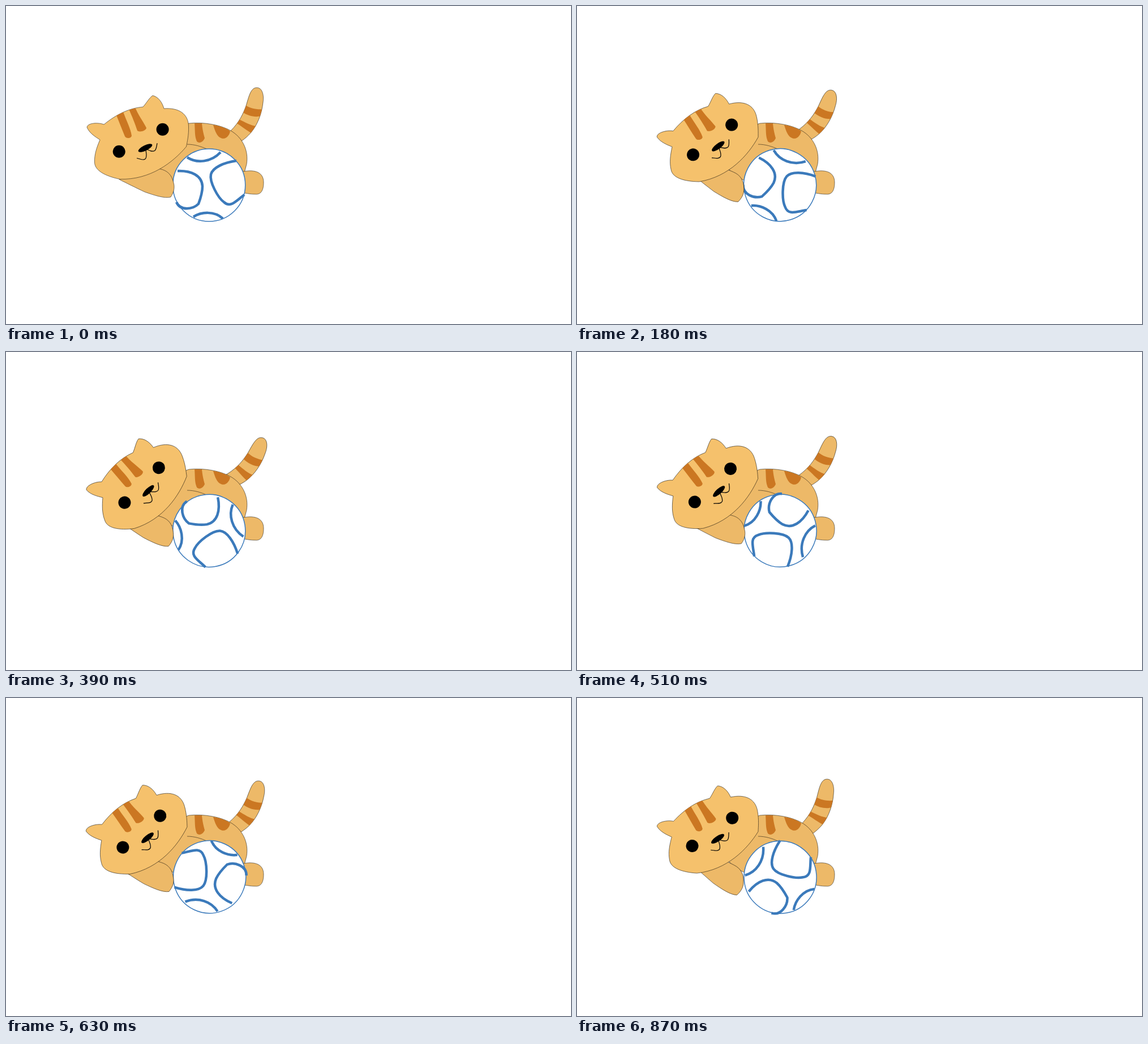
These frames come from a looping animation (998 by 561 pixels, 0.96 s). An HTML page:

```html
<!DOCTYPE html>
<html lang="en">
<head>
<meta charset="utf-8">
<title>Kitten with ball</title>
<style>
  html, body { margin: 0; width: 100%; height: 100%; overflow: hidden; background: #fff; }
  svg { display: block; width: 100vw; height: 100vh; }
  .fur { fill: #edb968; stroke: #000; stroke-width: .5; }
  .face { fill: #f5c16c; }
  .stripe { fill: #cb7722; }
  .line { fill: none; stroke: #000; stroke-width: .5; }
  .mouth { fill: none; stroke: #000; stroke-width: 1.2; }
  .seam { fill: none; stroke: #3b7abb; stroke-width: 4.5; }
</style>
</head>
<body>
<svg viewBox="0 0 998 561">
  <defs>
    <path id="tailShape" d="M390 226L397 220C412 205 419 190 424 176C429 160 432 144 443 144C453 144 456 158 454 170C452 190 444 210 433 223C427 230 420 236 410 242Z"/>
    <path id="headShape" d="M143 214C144 206 163 205 173 209C195 191 218 180 242 178C249 170 253 162 259 158C269 160 276 170 279 181C305 179 322 190 322.5 212C323 228 320 240 318.5 248C295 276 255 307 201 305.5C175 300 156 290 156.5 275C156 262 160 250 166 236C158 231 147 224 143 214Z"/>
    <clipPath id="tailClip"><use href="#tailShape"/></clipPath>
    <clipPath id="headClip"><use href="#headShape"/></clipPath>
  </defs>

  <g id="tail">
    <use href="#tailShape" class="fur"/>
    <path class="stripe" clip-path="url(#tailClip)" d="M423 175C432 181 443 183 455 182L451 194C440 197 428 194 417 187ZM412 200C422 205 432 211 443 212L435 225C424 219 415 211 406 206Z"/>
  </g>

  <path class="fur" d="M310 212L323 207C350 204 380 210 397 220C418 232 429 255 425 279L421 294L400 330L330 340L300 310L280 300L250 270Z"/>
  <path class="stripe" d="M333 207L346 207C347 218 349 226 351 233C347 243 337 243 336 236C333 228 334 215 333 207ZM366 210C380 212 390 216 396 221C394 231 386 236 380 233C373 231 369 220 366 210Z"/>
  <path class="line" d="M320 244C333 244 345 248 354 252"/>
  <path class="fur" d="M415 292L422 291.5C445 288 455 297 455 311C455 326 450 333 440 332C432 332 428 331 415 329Z"/>

  <g id="ball">
    <circle cx="358.7" cy="316" r="64" fill="#fff" stroke="#3b7abb" stroke-width="1.5"/>
    <path class="seam" d="M320 267C337 278 362 276 379 258M407 273C385 276 365 285 362 297C359 310 374 338 385 346C397 357 407 343 421 333M303 291C327 290 346 299 347 318C347 330 343 341 340 349C330 359 308 362 301 346M331 372C345 363 368 361 383 375"/>
  </g>

  <path id="arm" class="fur" d="M215 270L255 284L272 287.5C285 290 293 298 296 312C299 322 295 331 291 337C280 340 262 334 245 328C230 321 212 312 200 306Z"/>

  <g id="head">
    <use href="#headShape" class="fur face"/>
    <path class="stripe" clip-path="url(#headClip)" d="M194 190L206 184C213 204 220 215 222 229C221 234 212 234 210 230C205 218 200 205 194 190ZM216 180L227 176C233 192 242 203 248 215C247 221 235 223 232 220C228 208 223 195 216 180Z"/>
    <circle cx="199.7" cy="256.7" r="11"/>
    <circle cx="276.6" cy="217.8" r="11"/>
    <ellipse cx="246" cy="250.5" rx="13.5" ry="4.7" transform="rotate(-26 246 250.5)"/>
    <path class="mouth" d="M247 254L248 262C248 268 247 271 242 271C238 271 235 269 231 268.5M249 253C254 255 259 258 263 255C266 252 266 247 267 242"/>
  </g>
</svg>
<script>
  const STEP = 30, LAST = 29, LOOP = 960, CYCLE = 1000;

  // keys: [fraction of the swing cycle, angle in degrees]
  const parts = [
    { id: 'head', pivot: [231.8, 231.5], keys: [[0, 0], [.33, -20], [1, -5.2]] },
    { id: 'tail', pivot: [416, 191],     keys: [[0, 0], [.33, 15], [.75, .3], [1, -4.5]] },
    { id: 'arm',  pivot: [248, 311],     keys: [[0, 0], [.25, 16.7], [.5, 1], [.75, 11], [1, 20.4]] },
    { id: 'ball', pivot: [359.1, 315.7], keys: [[0, 0], [.25, 39], [.5, 113], [.75, 290.5], [1, 334]] }
  ].map(part => ({ ...part, node: document.getElementById(part.id) }));

  function angleAt(keys, p) {
    const i = keys.findIndex(key => key[0] > p);
    const [p0, a0] = keys[i - 1], [p1, a1] = keys[i];
    return a0 + (a1 - a0) * (p - p0) / (p1 - p0);
  }

  const start = performance.now();

  function draw() {
    const time = (performance.now() - start) % LOOP;
    const step = Math.min(LAST, Math.floor(time / STEP));
    for (const { node, pivot, keys } of parts)
      node.setAttribute('transform', `rotate(${angleAt(keys, step * STEP / CYCLE)} ${pivot})`);
    requestAnimationFrame(draw);
  }
  draw();
</script>
</body>
</html>
```
